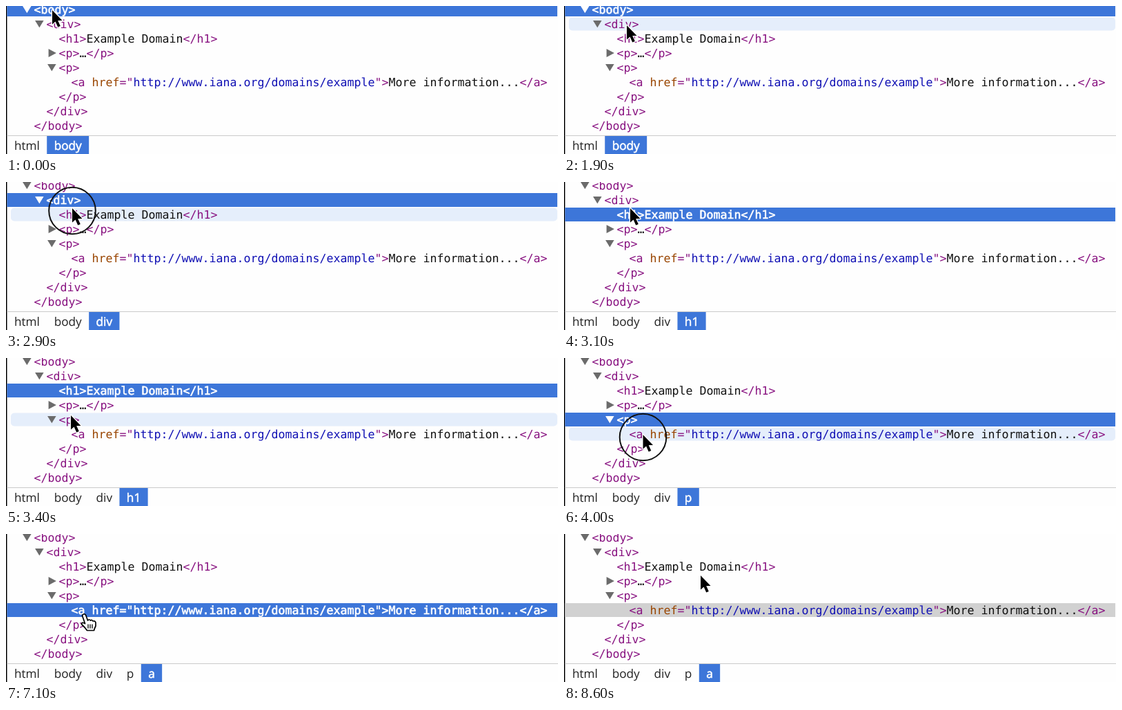
These frames come from a looping animation (800x214 px, 8.7 s). An HTML page with a canvas:

```html
<!DOCTYPE html>
<html lang="en">
<head>
<meta charset="utf-8">
<title>Element inspector</title>
<style>
  html, body { margin: 0; width: 100%; height: 100%; overflow: hidden; background: #fefefe; }
  canvas { display: block; }
</style>
</head>
<body>
<canvas width="800" height="214"></canvas>
<script>
const ctx = document.querySelector('canvas').getContext('2d');
const LOOP = 8700, STEP = 100, ROW = 21;
const CODE_FONT = '16.63px "DejaVu Sans Mono", monospace';
const CRUMB_FONT = '17.2px "Open Sans", sans-serif';
const BLUE = '#3d76d9', TAG = '#881280', ATTR = '#994500', URL_INK = '#1010b4', INK = '#111';

const tag = s => [s, TAG], plain = s => [s, INK];
const rows = [
  { depth: 0, arrow: 'open', text: [tag('<body>')] },
  { depth: 1, arrow: 'open', text: [tag('<div>')] },
  { depth: 2, text: [tag('<h1>'), plain('Example Domain'), tag('</h1>')] },
  { depth: 2, arrow: 'closed', text: [tag('<p>'), plain('…'), tag('</p>')] },
  { depth: 2, arrow: 'open', text: [tag('<p>')] },
  { depth: 3, text: [tag('<a '), ['href', ATTR], tag('="'),
    ['http://www.iana.org/domains/example', URL_INK], tag('">'),
    plain('More information...'), tag('</a>')] },
  { depth: 2, text: [tag('</p>')] },
  { depth: 1, text: [tag('</div>')] },
  { depth: 0, text: [tag('</body>')] },
];

// Each selection: start time, row and breadcrumb trail
const selections = [
  [0, 0, 'html body'],
  [2400, 1, 'html body div'],
  [3000, 2, 'html body div h1'],
  [3600, 4, 'html body div p'],
  [4100, 5, 'html body div p a'],
];
const BLUR = 7800;              // panel loses focus
const HAND = [4200, 7500];      // pointer is a hand over the link

// Pointer path: time, x, y
const path = [
  [0, 67, 6], [1800, 67, 6], [1900, 91, 28], [2500, 91, 28], [2800, 96, 38],
  [3100, 96, 38], [3400, 94, 83], [3600, 94, 83], [3900, 114.5, 111],
  [7400, 114.5, 111], [7800, 198, 60], [LOOP, 198, 60],
];

const arrowShape = new Path2D('M0 0V20.5L4.6 16.4L8.2 24.6L11.8 23L8.2 15H14.5Z');
const handShape = new Path2D('M-3 2Q-1 -2 2 1L5 9Q7 6.5 9 9Q11 7.5 12.5 10Q15.5 9 16.5 12V17Q15 20 14 23.5H4Q1 19 -4 14.5Q-4 11 0 13L1 13.5Z');
const fingerLines = new Path2D('M5.5 15V20M8.5 15V20M11.5 15V20');

function pointerAt(t) {
  const i = path.findIndex(p => p[0] > t);
  const [t0, x0, y0] = path[i - 1], [t1, x1, y1] = path[i];
  const k = (t - t0) / (t1 - t0), e = k * k * (3 - 2 * k);
  return [x0 + (x1 - x0) * e, y0 + (y1 - y0) * e];
}

function rect(x, y, w, h, color) {
  ctx.fillStyle = color;
  ctx.fillRect(x, y, w, h);
}

function write(text, x, y, color, heavy) {
  ctx.fillStyle = ctx.strokeStyle = color;
  ctx.fillText(text, x, y);
  if (heavy) {
    ctx.lineWidth = 0.6;
    ctx.strokeText(text, x, y);
  }
  return x + ctx.measureText(text).width;
}

function drawTriangle(kind, x, y, color) {
  const points = kind === 'open'
    ? [[x - 16.5, y - 5], [x - 4, y - 5], [x - 10.2, y + 5.2]]
    : [[x - 15, y - 6], [x - 3.7, y], [x - 15, y + 6]];
  ctx.beginPath();
  points.forEach(p => ctx.lineTo(...p));
  ctx.fillStyle = color;
  ctx.fill();
}

function drawRow(row, i, selected, hovered, focused) {
  const x = 40.6 + 18 * row.depth, middle = ROW * i + 5, active = selected && focused;
  if (selected) rect(1.5, middle - 10, 797.5, 20, focused ? BLUE : '#d1d1d1');
  else if (hovered) {
    ctx.fillStyle = '#e5eefb';
    ctx.beginPath();
    ctx.roundRect(7, middle - 9.5, 792, 19, 5);
    ctx.fill();
  }
  if (row.arrow) drawTriangle(row.arrow, x, middle, active ? '#fff' : '#6b6b6b');
  ctx.font = CODE_FONT;
  let end = x;
  for (const [text, color] of row.text)
    end = write(text, end, middle + 5.7, active ? '#fff' : color, active);
}

function drawCrumbs(trail) {
  rect(1.5, 187, 798.5, 1, '#cacaca');
  ctx.font = CRUMB_FONT;
  const names = trail.split(' ');
  let x = 1.5;
  names.forEach((name, i) => {
    const width = ctx.measureText(name).width + 20.8, last = i === names.length - 1;
    if (last) rect(x, 188, width, 26, BLUE);
    write(name, x + 10.4, 208, last ? '#fff' : '#222', last);
    x += width;
  });
}

function drawPointer(x, y, hand) {
  ctx.save();
  ctx.lineJoin = ctx.lineCap = 'round';
  if (hand) {
    ctx.translate(x - 1, y + 5);
    ctx.fillStyle = '#fff';
    ctx.strokeStyle = '#000';
    ctx.lineWidth = 1.7;
    ctx.fill(handShape);
    ctx.stroke(handShape);
    ctx.lineWidth = 1.3;
    ctx.stroke(fingerLines);
  } else {
    ctx.translate(x, y);
    ctx.strokeStyle = '#fff';
    ctx.lineWidth = 2.6;
    ctx.stroke(arrowShape);
    ctx.fillStyle = '#000';
    ctx.fill(arrowShape);
  }
  ctx.restore();
}

function drawClick(x, y) {
  ctx.beginPath();
  ctx.arc(x, y + 3.5, 33.8, 0, 2 * Math.PI);
  ctx.strokeStyle = '#111';
  ctx.lineWidth = 2;
  ctx.stroke();
}

function draw(now) {
  const t = Math.floor(now % LOOP / STEP) * STEP;
  const [x, y] = pointerAt(t);
  const [, selected, trail] = selections.findLast(s => s[0] <= t);
  const focused = t < BLUR;
  const hovered = focused ? Math.floor((y + 5) / ROW) : -1;
  const clicking = selections.slice(1).some(([at]) => t >= at - 100 && t < at + 100);

  ctx.textRendering = 'geometricPrecision';
  rect(0, 0, 800, 214, '#fefefe');
  rect(0, 0, 1.5, 214, '#000');
  rows.forEach((row, i) => drawRow(row, i, i === selected, i === hovered, focused));
  drawCrumbs(trail);
  drawPointer(x, y, t >= HAND[0] && t < HAND[1]);
  if (clicking) drawClick(x, y);
  requestAnimationFrame(() => draw(performance.now()));
}

draw(0);
</script>
</body>
</html>
```
